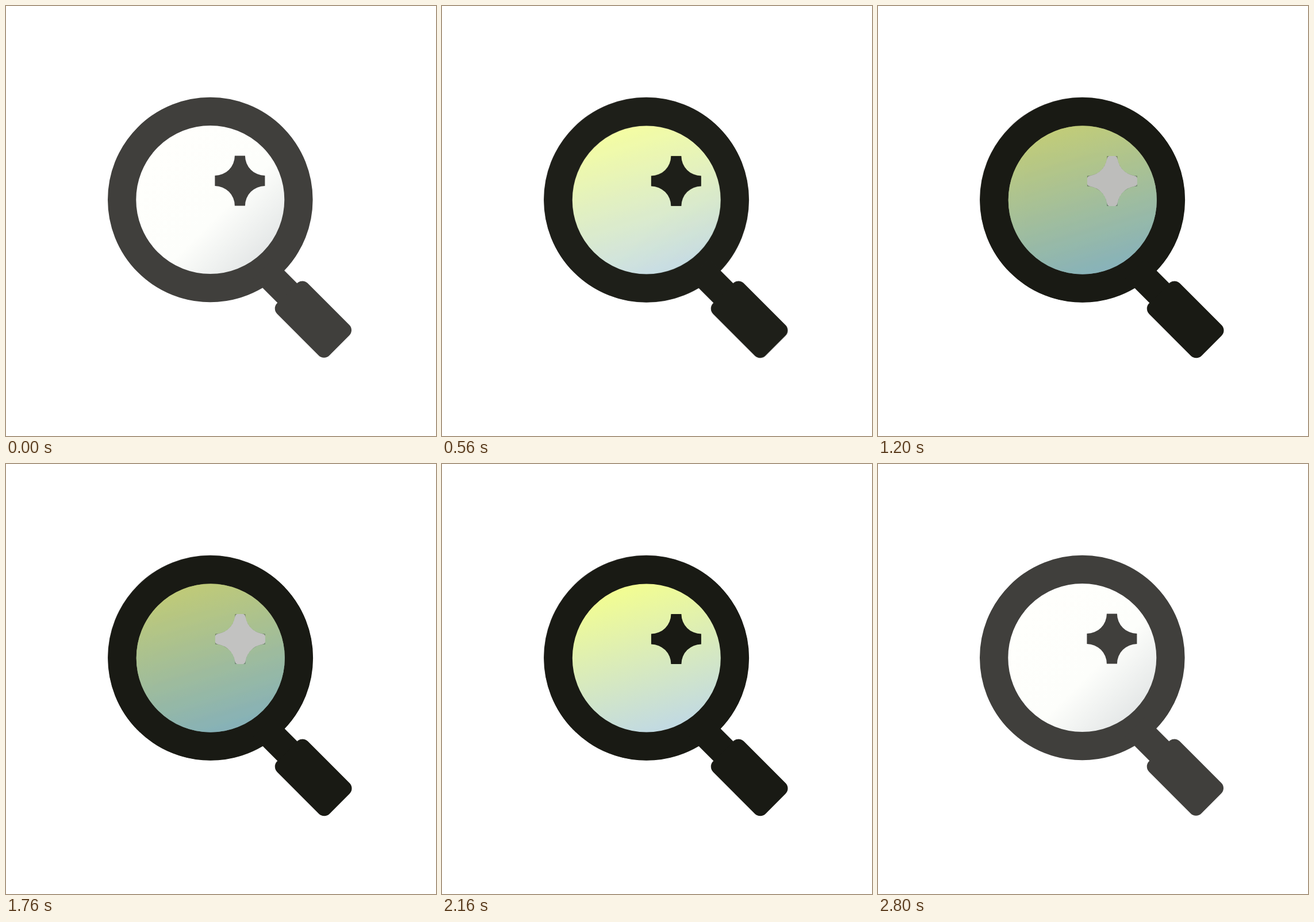
Recreate the animation shown at these times as an HTML page. Size 748 px wide and 748 px high, loop 2960 ms.

```html
<!DOCTYPE html>
<html lang="en">
<head>
<meta charset="utf-8">
<title>Magnifying glass</title>
<style>
  html, body { margin: 0; width: 100%; height: 100%; overflow: hidden; background: #fff; }
  svg { display: block; width: 100%; height: 100%; }
</style>
</head>
<body>
<svg viewBox="0 0 748 748">
  <defs>
    <linearGradient id="clear" gradientUnits="userSpaceOnUse" x1="264" y1="246" x2="450" y2="432">
      <stop stop-color="#fffffc"/>
      <stop offset=".6" stop-color="#fdfefb"/>
      <stop offset="1" stop-color="#e4e7e7"/>
    </linearGradient>
    <linearGradient id="pale" gradientUnits="userSpaceOnUse" x1="318" y1="215" x2="392" y2="455">
      <stop stop-color="#f2fd92"/>
      <stop offset="1" stop-color="#c2dae1"/>
    </linearGradient>
    <linearGradient id="deep" gradientUnits="userSpaceOnUse" x1="318" y1="215" x2="392" y2="455">
      <stop stop-color="#adb86f"/>
      <stop offset="1" stop-color="#72a3a8"/>
    </linearGradient>
    <circle id="lens" cx="355.8" cy="337.5" r="131"/>
    <g id="body">
      <circle cx="355.8" cy="337.5" r="153.65" fill="none" stroke="currentColor" stroke-width="49.3"/>
      <g transform="rotate(45)" fill="currentColor">
        <rect x="640" y="-17" width="70" height="48.1"/>
        <rect x="699.8" y="-30.1" width="128.4" height="75.3" rx="13"/>
      </g>
      <path transform="translate(407.4 304.5)" fill="currentColor"
        d="M-9-43.5H9A34.5 34.5 0 0 0 43.5-9V9A34.5 34.5 0 0 0 9 43.5H-9A34.5 34.5 0 0 0-43.5 9V-9A34.5 34.5 0 0 0-9-43.5Z"/>
    </g>
    <clipPath id="opening"><circle cx="355.8" cy="337.5" r="129.2"/></clipPath>
  </defs>

  <g color="#403f3c" transform="translate(-.5 -.5)">
    <use href="#lens" fill="url(#clear)"/>
    <use href="#body"/>
  </g>
  <g id="tinted" color="#191a14" opacity="0">
    <use href="#lens" fill="url(#pale)"/>
    <use href="#body"/>
  </g>
  <g id="shining" opacity="0" clip-path="url(#opening)">
    <use href="#lens" fill="url(#deep)"/>
    <path transform="translate(407.4 304.5)" fill="#fff"
      d="M-5-43.5H5Q8.6-43.5 9.8-36A34.5 34.5 0 0 0 36-9.8Q43.5-8.6 43.5-5V5Q43.5 8.6 36 9.8A34.5 34.5 0 0 0 9.8 36Q8.6 43.5 5 43.5H-5Q-8.6 43.5-9.8 36A34.5 34.5 0 0 0-36 9.8Q-43.5 8.6-43.5 5V-5Q-43.5-8.6-36-9.8A34.5 34.5 0 0 0-9.8-36Q-8.6-43.5-5-43.5Z"/>
  </g>
</svg>
<script>
  const LOOP = 2960, STEP = 80, FADE = 600;
  const tinted = document.getElementById('tinted');
  const shining = document.getElementById('shining');

  const bezier = (a, b, u) => 3 * a * u * (1 - u) ** 2 + 3 * b * u * u * (1 - u) + u ** 3;

  // The CSS "ease" curve, solved by bisection.
  function ease(x) {
    let low = 0, high = 1;
    for (let i = 0; i < 24; i++) {
      const mid = (low + high) / 2;
      if (bezier(.25, .25, mid) < x) low = mid; else high = mid;
    }
    return bezier(.1, 1, low);
  }

  // lead: how far into the fade its first visible step falls, in ms.
  function fade(t, first, last, lead) {
    if (t < first) return 0;
    return t >= last ? 1 : ease((t - first + lead) / FADE);
  }

  function draw() {
    const t = Math.floor(performance.now() % LOOP / STEP) * STEP;
    tinted.setAttribute('opacity', fade(t, 320, 800, 85) - fade(t, 2400, 2800, 45));
    shining.setAttribute('opacity', fade(t, 1040, 1440, 93) - fade(t, 1680, 2160, 31));
    requestAnimationFrame(draw);
  }
  draw();
</script>
</body>
</html>
```
